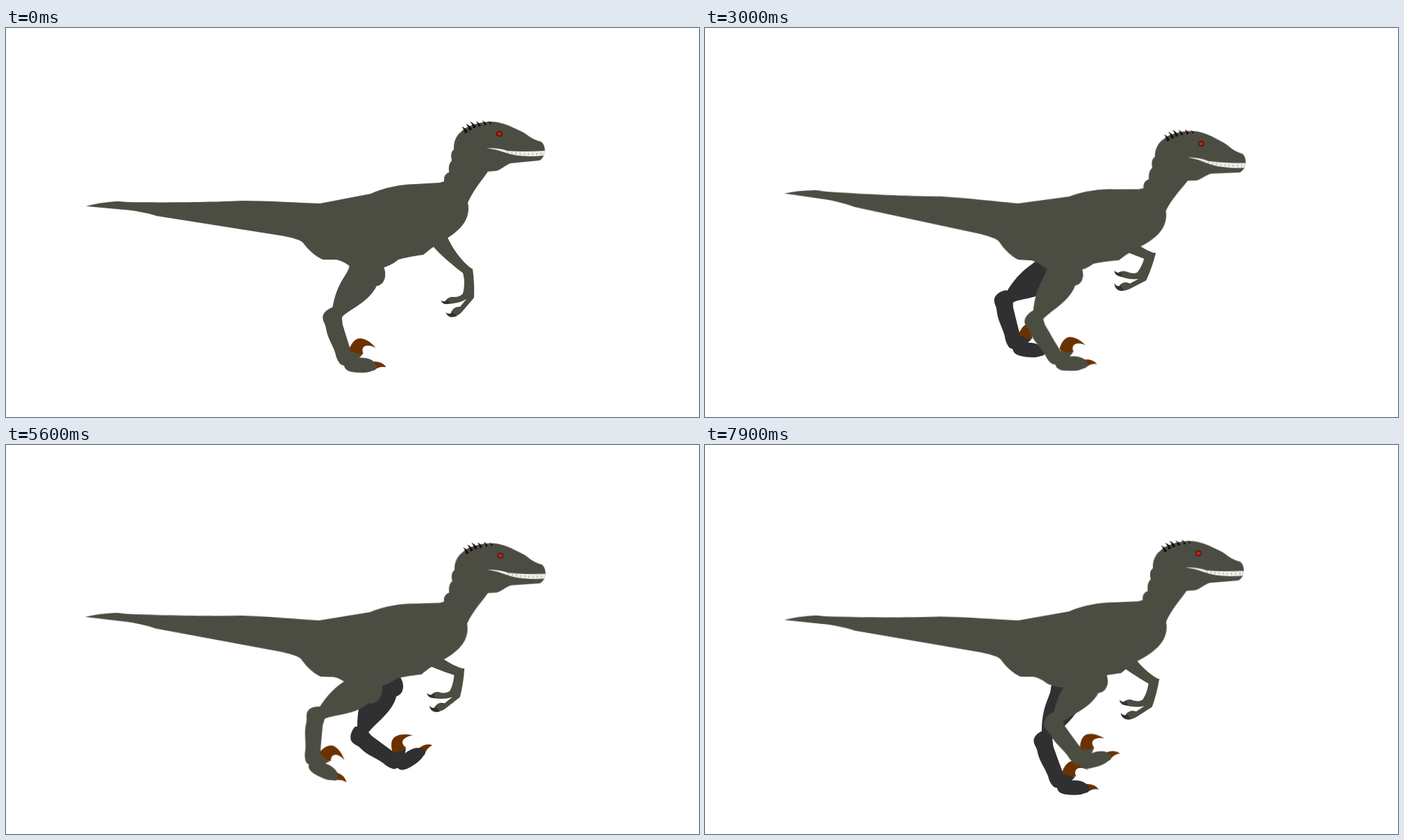
These frames come from a looping animation (998 by 561 pixels, 8 s). An HTML page without scripts:

```html
<!DOCTYPE html>
<html lang="en">
<head>
<meta charset="utf-8">
<title>Running raptor</title>
<style>
  @property --kx { syntax: "<number>"; inherits: true; initial-value: 530; }
  @property --fx { syntax: "<number>"; inherits: true; initial-value: 490; }
  @property --fy { syntax: "<number>"; inherits: true; initial-value: 478; }
  @property --ex { syntax: "<number>"; inherits: true; initial-value: 672; }
  @property --ey { syntax: "<number>"; inherits: true; initial-value: 348; }

  html, body { margin: 0; width: 100%; height: 100%; overflow: hidden; background: #fff; }
  svg { display: block; width: 100vw; height: 100vh; fill: #4c4d42; }
  .claw { fill: #6b3200; }
  .nail { fill: #303236; }
  .body, .arm, .leg { animation: 8s linear infinite; }

  .body { animation-name: bob; transform-origin: 452px 253px; }
  @keyframes bob {
    0% { transform: none; }
    11.25% { transform: translate(1px, 6px); }
    22.5% { transform: translate(0, 2px) rotate(2.3deg); }
    27.5% { transform: translate(-1px, 0) rotate(5deg); }
    58% { transform: translate(-1px, 0) rotate(-.7deg); }
    87.5% { transform: translate(-1px, 0) rotate(4.8deg); }
    98.75%, to { transform: translate(-1px, 0) rotate(.8deg); }
  }

  /* the arm folds as the elbow is drawn in and up */
  .arm { animation-name: elbow; transform: translate(calc(var(--ex) * 1px), calc(var(--ey) * 1px)); }
  .upper { transform: rotate(calc((var(--ey) - 343) * .8deg)); }
  .fore { transform: rotate(calc((672 - var(--ex)) * .95deg)); }
  @keyframes elbow {
    0% { --ex: 672; --ey: 348; }
    11.25% { --ex: 657; --ey: 341; }
    27.5% { --ex: 639; --ey: 327; }
    48.75%, 70% { --ex: 660; --ey: 323; }
    87.5% { --ex: 643; --ey: 334; }
    98.75%, to { --ex: 654; --ey: 338; }
  }

  /* knee and ankle positions are given; the two links between them are solved */
  .leg {
    --l1: 83;
    --l2: 63.6;
    --reach: max(0, var(--kx) - 530);
    --ky: calc(356 - var(--reach) * var(--reach) / 80);
    --d: hypot(var(--fx) - var(--kx), var(--fy) - var(--ky));
    --aim: atan2(var(--fy) - var(--ky), var(--fx) - var(--kx));
    --open: acos((var(--d) * var(--d) + var(--l1) * var(--l1) - var(--l2) * var(--l2)) / (2 * var(--l1) * var(--d)));
    --bend: acos((var(--l1) * var(--l1) + var(--l2) * var(--l2) - var(--d) * var(--d)) / (2 * var(--l1) * var(--l2)));
    --thigh: calc(var(--aim) + var(--open) - 134.5deg);
    --heel: calc(var(--bend) - 119.1deg);
    --lift: clamp(0, (480 - var(--fy)) / 14, 1);
    transform: translate(calc(var(--kx) * 1px), calc(var(--ky) * 1px));
  }
  .thigh { transform: rotate(var(--thigh)); }
  .shank { transform: translate(-58px, 59px) rotate(var(--heel)); }
  /* flat on the ground, in line with the shank in the air */
  .foot { transform: translate(18px, 61px) rotate(calc((var(--thigh) + var(--heel)) * (var(--lift) - 1))); }

  .near { animation-name: near; }
  @keyframes near {
    0% { --kx: 530; --fx: 490; --fy: 478; }
    11.25% { --kx: 535; --fx: 519; --fy: 482; }
    27.5% { --kx: 544; --fx: 564; --fy: 481; }
    48.75% { --kx: 511; --fx: 443; --fy: 472; }
    70% { --kx: 525; --fx: 442; --fy: 454; }
    87.5% { --kx: 563; --fx: 525; --fy: 431; }
    98.75%, to { --kx: 564; --fx: 540; --fy: 452; }
  }
  .far { animation-name: far; fill: #303032; }
  @keyframes far {
    0% { --kx: 530; --fx: 490; --fy: 478; }
    11.25% { --kx: 505; --fx: 449; --fy: 480; }
    27.5% { --kx: 483; --fx: 391; --fy: 453; }
    48.75% { --kx: 536; --fx: 509; --fy: 456; }
    70% { --kx: 556; --fx: 561; --fy: 457; }
    87.5% { --kx: 553; --fx: 577; --fy: 481; }
    98.75%, to { --kx: 535; --fx: 510; --fy: 486; }
  }
</style>
</head>
<body>
<svg viewBox="0 0 998 561">
  <defs>
    <!-- origins: knee, heel, ankle -->
    <g id="leg">
      <g class="thigh">
        <g class="shank">
          <g class="foot">
            <path class="claw" d="M4-14Q10-30 20-30Q31-29 42-17Q32-22 26-19Q21-16 24-8L10-4ZM34 4Q50 1 57 11Q48 9 39 16Z"/>
            <path d="M-11 0Q-11 8-3 9Q-2 16 8 18Q22 20 32 18L41 15 44 12Q42 4 36 1Q28-3 18-2L23-7Q14-8 9-11L-5-8Z"/>
          </g>
          <path d="M-1-14C-9-12-17-6-17 1C-17 7-13 10-12 17C-10 30-2 40 2 52Q4 62 9 67L18 70 26 54C22 44 16 25 11 10L10 0Q8-10-1-14Z"/>
        </g>
        <path d="M-35-13C-38 0-53 8-61 47L-58 62-48 60C-40 50-8 39 3 16Q10 15 13 10Q18 2 15-8Q8-30-12-32Q-30-28-35-13Z"/>
      </g>
    </g>
    <path id="spike" d="M0 0Q-3-6-9-8Q-5-4-4 2Z"/>
  </defs>

  <use href="#leg" class="leg far"/>

  <g class="body">
    <path d="M115 257C135 252 150 250 163 250L175 251C230 252 300 251 340 249C380 249 420 252 452 253L525 239C545 230 570 225 590 225L625 223 631 221
      C630 216 632 210 638 208C637 200 638 195 642 191C640 183 641 178 645 175C644 165 648 155 656 149C662 142 680 135 700 135
      C715 136 725 141 740 148C750 152 756 161 771 164Q776 169 776 177L774 185Q771 190 768 191L727 195C720 197 712 205 706 206L694 207
      C685 220 672 235 665 252C668 265 664 280 650 292C640 301 632 305 627 308L612 318 601 327C585 329 572 332 565 334
      C558 340 550 343 543 346C530 351 510 350 496 344C490 340 485 336 475 334L457 334C445 330 432 316 428 310
      C425 306 415 303 400 300L217 271C205 267 185 263 170 262Z"/>
    <g fill="#160a0b">
      <use href="#spike" x="665" y="150"/>
      <use href="#spike" x="671" y="146"/>
      <use href="#spike" x="677" y="143"/>
      <use href="#spike" transform="translate(684 141) scale(.8)"/>
      <use href="#spike" transform="translate(692 139) scale(.7)"/>
      <use href="#spike" transform="translate(699 138) scale(.5)"/>
    </g>
    <ellipse cx="710.5" cy="152.5" rx="4" ry="3.6" fill="#c8200a" stroke="#150505"/>
    <path fill="#f0f0ec" d="M692 173Q712 173 722 177Q745 179 776 177L774 184Q740 187 720 180Q706 175 692 173Z"/>
    <path fill="none" stroke="#b4b4ac" stroke-width="3" stroke-dasharray="1.5 4.5" d="M722 179Q745 183 773 181"/>
  </g>

  <g class="arm">
    <path class="upper" d="M0 0C-17-10-32-30-39-43L-54-46-60-30C-48-18-32-6-14 6L-4 6Z"/>
    <g class="fore">
      <path d="M0-1Q3 20 2 41L-15 61Q-22 69-30 68L-31 62Q-27 53-18 54L-9 43Q-20 50-38 50L-39 45Q-34 39-27 40Q-18 40-14 35Q-10 20-14 5Z"/>
      <path class="nail" d="M-46 45Q-40 48-36 44L-32 49Q-42 53-46 45ZM-39 62Q-34 66-29 62L-22 67Q-34 73-39 62Z"/>
    </g>
  </g>

  <use href="#leg" class="leg near"/>
</svg>
</body>
</html>
```
